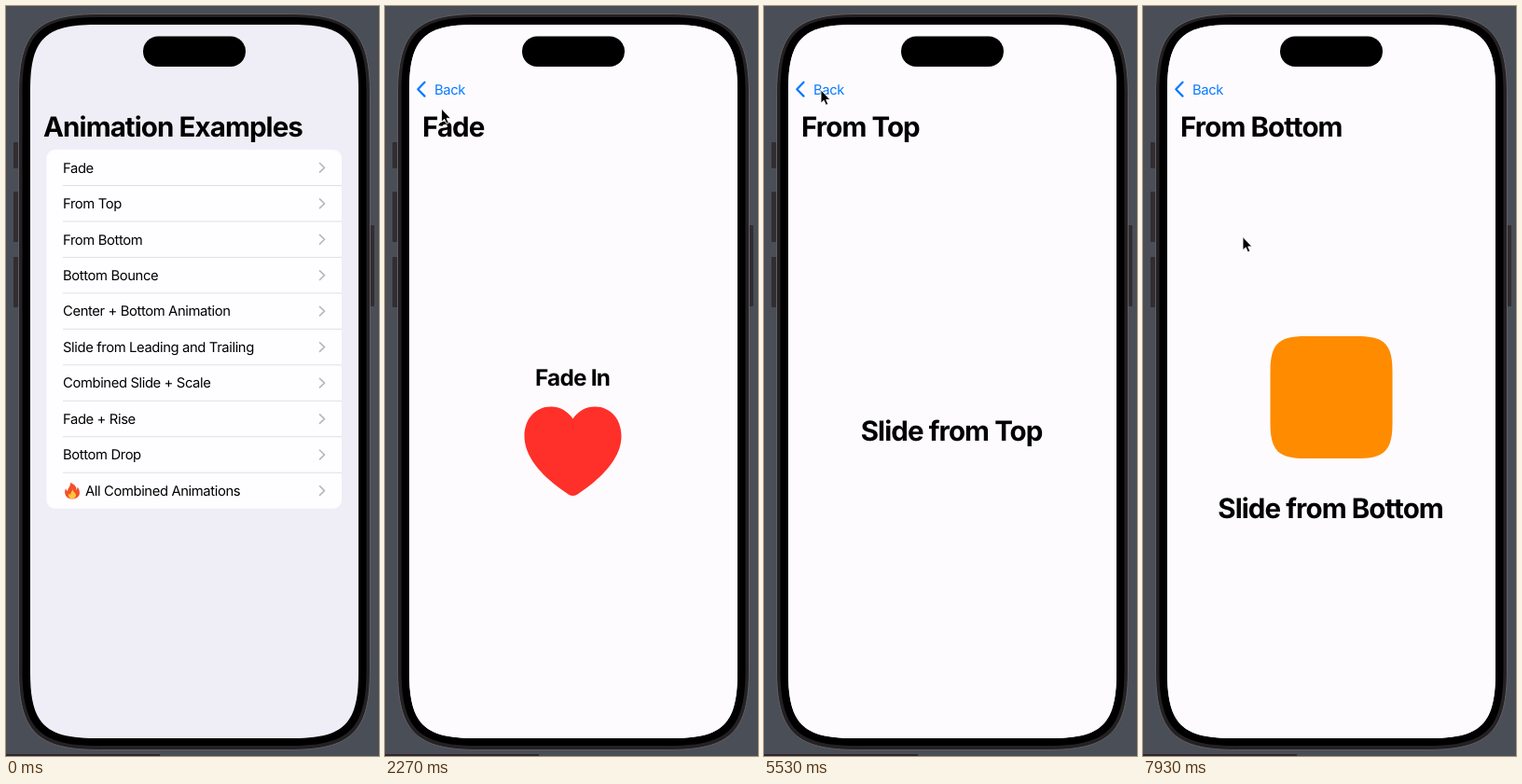
These frames come from a looping animation (400 by 804 pixels, 8000 ms). An HTML page:

```html
<!DOCTYPE html>
<html lang="en">
<head>
<meta charset="utf-8">
<title>Animation Examples</title>
<style>
html, body { margin: 0; width: 100%; height: 100%; overflow: hidden; background: #4a4e56; }
svg { display: block; width: 100vw; height: 100vh; }
text { font: 14.8px Inter, "Liberation Sans", sans-serif; letter-spacing: -.026em; text-rendering: geometricPrecision; }
.title { font-size: 29.5px; font-weight: 700; letter-spacing: -.031em; }
.small { font-size: 24.3px; }
.mid { text-anchor: middle; }
.line { fill: none; stroke-linecap: round; stroke-linejoin: round; }
</style>
</head>
<body>
<svg id="stage" viewBox="0 0 400 804"></svg>
<script>
const LOOP = 8000, WIDTH = 352, ROW = 38.47, TOP = 154;
const rows = ['Fade', 'From Top', 'From Bottom', 'Bottom Bounce', 'Center + Bottom Animation',
  'Slide from Leading and Trailing', 'Combined Slide + Scale', 'Fade + Rise', 'Bottom Drop', 'All Combined Animations'];

// rounded rectangle with smooth, continuous corners
function squircle(x, y, w, h, r) {
  const a = 1.4 * r, k = .315 * r, b = a - k, X = w - 2 * a, Y = h - 2 * a;
  return `M${x} ${y + a}c0 ${-b} ${k} ${-a} ${a} ${-a}`.replace(/c.*/, `c0 ${-b} ${k} ${-a} ${a} ${-a}`)
    .replace(/c.*/, `C${x} ${y + k} ${x + k} ${y} ${x + a} ${y}`) +
    `h${X}C${x + w - k} ${y} ${x + w} ${y + k} ${x + w} ${y + a}` +
    `v${Y}C${x + w} ${y + h - k} ${x + w - k} ${y + h} ${x + w - a} ${y + h}` +
    `h${-X}C${x + k} ${y + h} ${x} ${y + h - k} ${x} ${y + h - a}Z`;
}

const heart = `<path fill="#ff3029" d="M201.5 442.500C196 434 187 429.500 178 429.500C161 429.500 149.500 443 149.500 461
  C149.500 486 173 508 197 523.700Q201.500 526.500 206 523.700C230 508 253.500 486 253.500 461
  C253.500 443 242 429.500 225 429.500C216 429.500 207 434 201.500 442.500Z"/>`;
const label = (s, y, cls = '') => `<text class="title mid ${cls}" x="201.1" y="${y}">${s}</text>`;

// dy: distance the content travels while it appears
const pages = [
  { row: 0, push: 1230, pop: 2900, dy: 0, body: label('Fade In', 406.5, 'small') + heart },
  { row: 1, push: 3895, pop: 5670, dy: -284, body: label('Slide from Top', 466) },
  { row: 2, push: 6940, pop: 1e9, dy: 284,
    body: `<path fill="#ff8b00" d="${squircle(136.5, 354, 131, 131, 27)}"/>` + label('Slide from Bottom', 548.5) }
];

// time, x, y of the pointer tip
const moves = [[70, 245, 517], [900, 167.5, 183.500], [1330, 167.5, 183.5], [2270, 60.5, 110], [2650, 47, 90.5],
  [3250, 47, 90.5], [3780, 121, 214.5], [4450, 121, 214.5], [5200, 106, 194], [5500, 61, 90],
  [5750, 61, 90], [6200, 96.5, 175.5], [6700, 107, 247.5], [LOOP, 107, 247.5]];

const button = (x, y, h) => `<rect x="${x}" y="${y}" width="5" height="${h}" rx="1" fill="#312d31"/>`;
const rowMarkup = (name, i) => {
  const y = TOP + i * ROW, last = i === 9;
  return `<text x="${last ? 85 : 61}" y="${y + 24.6}">${name}</text>
    <path class="line" stroke="#b9b9be" stroke-width="1.7" d="M336.500 ${y + 14.5}l5 4.800l-5 4.800"/>` +
    (last ? '' : `<path stroke="#e0dfe4" d="M61 ${y + ROW}H360"/>`);
};
const flame = `<g transform="translate(63 511)">
  <path fill="#f2502c" d="M6 0C11 2 13 5 12.500 8C13.500 7 13.500 5.500 13.500 4.500C18 10 16.500 17 8.500 17.500
    C1 17.500-1.500 11 1.200 6C1.500 7.500 2 8.500 3 9C3 6 6.500 4 6 0Z"/>
  <path fill="#ffc53a" d="M8.500 7C8.500 10 12.500 11 12 14C11.500 16.500 9.500 17.200 8 17.200
    C5 17.200 3.200 14.500 4.500 11.500C5 12.500 5.500 12.800 6.200 13C6 10.500 8 9.500 8.500 7Z"/></g>`;

const stage = document.getElementById('stage');
stage.innerHTML = `
<defs>
  <clipPath id="screen"><path d="${squircle(26, 20, WIDTH, 765, 50)}"/></clipPath>
  <clipPath id="card"><rect x="43.5" y="${TOP}" width="316.5" height="${ROW * 10}" rx="9"/></clipPath>
</defs>
<rect width="400" height="804" fill="#4a4e56"/>
<rect y="802" width="165" height="2" fill="#30272d"/>
${button(8, 146, 28) + button(8, 199, 54) + button(8, 269, 54) + button(390, 235, 87)}
<path d="${squircle(13.5, 8.5, 377, 789, 62)}" fill="#242124" stroke="#625f62"/>
<path d="${squircle(17.5, 12, 369, 781, 58)}"/>
<g clip-path="url(#screen)">
  <rect x="26" y="20" width="${WIDTH}" height="765" fill="#efeef6"/>
  <g id="list"><g clip-path="url(#card)">
    <rect x="43" y="${TOP}" width="318" height="385" fill="#fefdff"/>
    <rect id="mark" x="43" width="318" height="${ROW}" fill="#d1d1d6"/>
    ${rows.map(rowMarkup).join('')}${flame}
  </g></g>
  <rect id="dim" x="26" y="20" width="${WIDTH}" height="765"/>
  <g id="page">
    <rect x="26" y="20" width="${WIDTH}" height="765" fill="#fdfbfe"/>
    <g id="content"></g>
  </g>
  <text id="heading" class="title">Animation Examples</text>
  <text id="pageTitle" class="title" y="140"></text>
  <path id="chevron" class="line" stroke="#087bff" stroke-width="2.3" d="M42.500 81.800L35.300 89.200L42.500 96.600"/>
  <text id="back" fill="#087bff">Back</text>
</g>
<rect x="147" y="32.500" width="110" height="32.500" rx="16.250"/>
<path id="pointer" stroke="#fff" stroke-width=".9" stroke-linejoin="round"
  d="M0 0V14.200L3.200 11.300L5.400 16.300L7.800 15.300L5.700 10.400H10Z"/>`;

const el = id => document.getElementById(id);
const set = (id, attrs) => { for (const a in attrs) el(id).setAttribute(a, attrs[a]); };
const at = (x, y, s = 1) => `translate(${x} ${y}) scale(${s})`;
const clamp = v => Math.min(1, Math.max(0, v));
// remaining part of a critically damped spring after ms
const spring = ms => ms <= 0 ? 1 : (1 + .014 * ms) * Math.exp(-.014 * ms);

function pointerAt(t) {
  const i = moves.findIndex(m => m[0] > t);
  const [t0, x0, y0] = moves[i - 1], [t1, x1, y1] = moves[i];
  const u = (t - t0) / (t1 - t0), k = u * u * (3 - 2 * u);
  return at(x0 + (x1 - x0) * k, y0 + (y1 - y0) * k);
}

let shown;
function draw(t) {
  const page = pages.findLast(p => t >= p.push - 80) || pages[0];
  if (page !== shown) {
    shown = page;
    el('content').innerHTML = page.body;
    el('pageTitle').textContent = rows[page.row];
  }
  const popping = t >= page.pop;
  const p = popping ? spring(t - page.pop) : 1 - spring(t - page.push);
  const rest = 1 - p;
  const left = (1 - clamp((t - page.push) / 800)) ** 2;

  set('list', { transform: at(-.3 * WIDTH * p, 0) });
  set('mark', { y: TOP + page.row * ROW, opacity: popping ? p : t >= page.push - 80 ? 1 : 0 });
  set('dim', { opacity: .1 * p });
  set('page', { transform: at(WIDTH * rest, 0) });
  set('content', { transform: at(0, page.dy * left), opacity: page.dy ? 1 - left * left : 1 - left });
  set('heading', { transform: at(40 + 13 * p, 140 - 45.5 * p, 1 - .5 * p), opacity: rest ** 1.7 });
  set('pageTitle', { x: 40 + WIDTH * rest ** 1.5, opacity: p });
  set('chevron', { opacity: p * p });
  set('back', { transform: at(53 - 13 * rest, 94.5 + 45.5 * rest, 1 + rest), opacity: p * p });
  set('pointer', { visibility: t < 70 ? 'hidden' : 'visible' });
  if (t >= 70) set('pointer', { transform: pointerAt(t) });
}

const start = performance.now();
function tick() {
  draw((performance.now() - start) % LOOP);
  requestAnimationFrame(tick);
}
tick();
</script>
</body>
</html>
```
